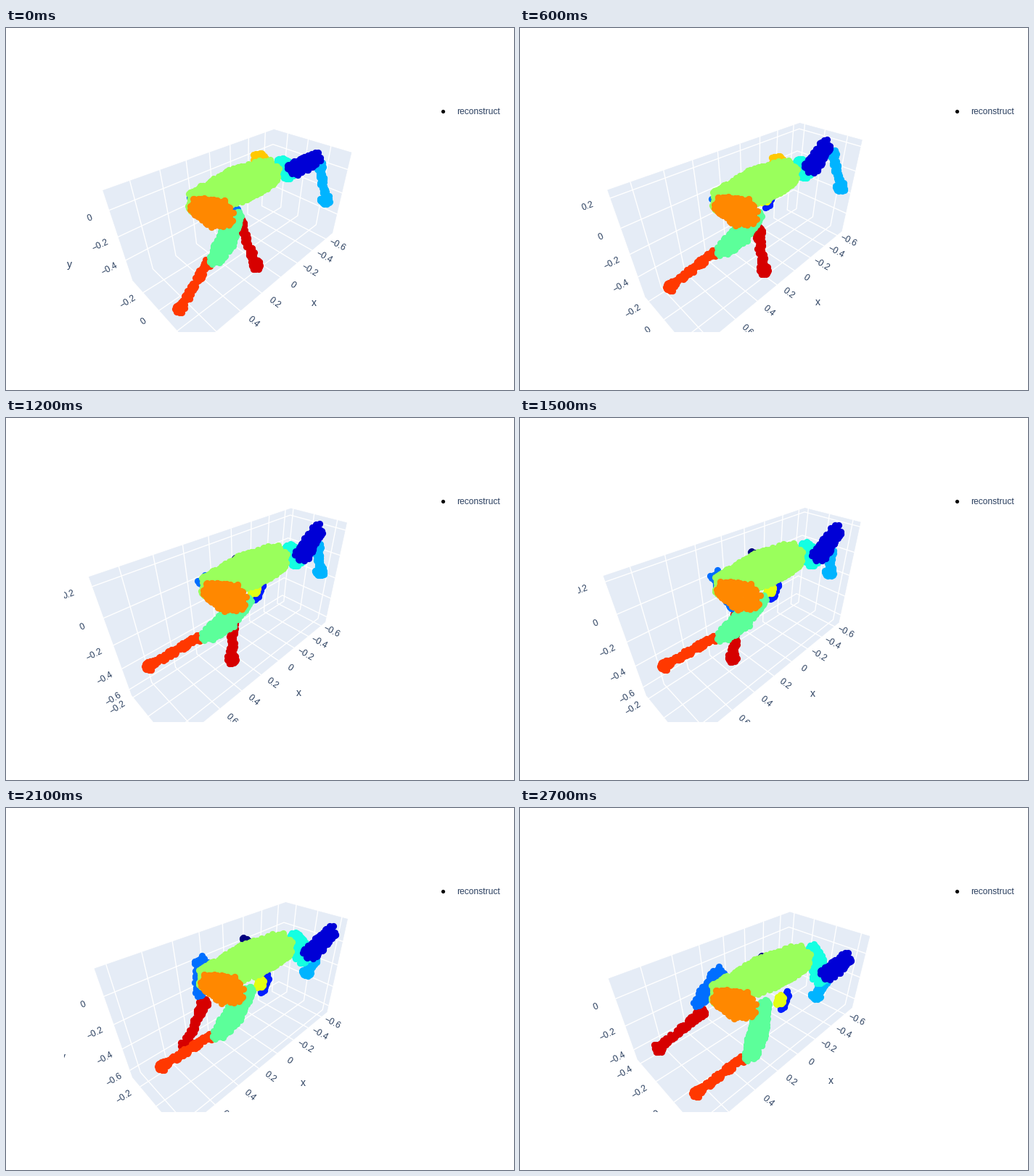
These frames come from a looping animation (700x500 px, 3000 ms). A matplotlib script:

```python
import matplotlib.pyplot as plt
import numpy as np
from matplotlib.animation import FuncAnimation
from matplotlib.patches import Polygon, Rectangle

W, H, DPI = 700, 500, 100
FRAMES, INTERVAL = 10, 300
PT = 72 / DPI
INK, WALL = "#2a3f5f", "#e5ecf6"
SCENE = (80, 100, 492, 320)
CENTER = np.array([326, 260])
FOCAL = 160 / np.tan(np.pi / 8)
EYE = 1.25 * np.sqrt(3)
TICK, TICK_GAP, TITLE_GAP = 0.2, 0.122, 0.325
DOT = 9.2

rng = np.random.default_rng(7)


def path(*poses):
    """Cubic motion through four poses spread evenly over the run."""
    curve = np.polyfit(np.linspace(0, 1, 4), np.array(poses, float), 3)
    return np.vander(np.linspace(0, 1, FRAMES), 4) @ curve


# Axis ranges
low = path((-.712, -.598, -.348), (-.675, -.628, -.230),
           (-.684, -.694, -.262), (-.718, -.491, -.446))
high = path((.758, .1315, .363), (.950, .262, .295),
            (.900, .202, .248), (.777, .130, .262))

# Skeleton: the moving joints, then those carried along by the trunk
chest = path((263, 241), (280, 236), (279, 232), (275, 257))
rump = path((359, 200), (368, 198), (375, 190), (383, 208))
knee = path((289, 319), (277, 302), (285, 304), (318, 342))
hoof = path((240, 387), (200, 347), (206, 346), (244, 393))
far_shoulder = path((262, 234), (274, 232), (270, 214), (274, 228))
far_knee = path((322, 270), (322, 280), (286, 270), (249, 283))
far_hoof = path((344, 327), (325, 334), (271, 329), (191, 331))
stifle = path((397, 195), (404, 192), (415, 195), (423, 230))
hock = path((428, 179), (424, 156), (443, 160), (450, 207))
shin = path((432, 187), (430, 170), (427, 196), (421, 238))
hind_hoof = path((440, 237), (438, 214), (420, 217), (408, 258))
far_thigh = path((336, 230), (343, 249), (350, 250), (361, 277))
tail = path((318, 222), (316, 206), (326, 182), (336, 207))
far_hip = path((346, 181), (354, 188), (358, 198), (360, 205))
belly = 0.4 * chest + 0.6 * rump
shoulder = belly + (-3, 43)
thigh = (shoulder + knee) / 2 + (0, 3)


class Part:
    """A cloud of dots around a chain of joints."""

    def __init__(self, color, count, radii, *joints):
        self.color = np.array(color) / 255
        self.joints = joints
        self.t = rng.permutation(np.linspace(0, len(radii) - 1, count))
        angle = rng.uniform(0, 2 * np.pi, count)
        reach = (self.along(radii) - DOT / 2) * rng.random(count) ** 0.4
        self.offset = np.column_stack([reach * np.cos(angle), reach * np.sin(angle)])

    def along(self, values):
        return np.interp(self.t, np.arange(len(values)), values)

    def dots(self, frame):
        xs, ys = zip(*(joint[frame] for joint in self.joints))
        return np.column_stack([self.along(xs), self.along(ys)]) + self.offset


def leg(color, top, foot, thickness):
    """A thin limb that ends in a round foot."""
    return [Part(color, 80, (thickness + 1, thickness), top, foot),
            Part(color, 35, (11.5, 11.5), foot, foot)]


# Far parts first
parts = [
    Part((0, 0, 127), 40, (10, 9), tail, tail + (3, 8)),
    Part((255, 200, 0), 60, (13, 12), far_hip, far_hip + (6, -2)),
    Part((0, 30, 255), 40, (8, 7.5), far_thigh + (7, -22), far_thigh),
    Part((226, 255, 20), 40, (9, 9), far_thigh + (-2, -15), far_thigh + (-4, -7)),
    *leg((0, 180, 255), shin, hind_hoof, 8),
    *leg((214, 0, 0), far_knee, far_hoof, 8.5),
    Part((214, 0, 0), 35, (11, 11), far_knee, far_knee),
    Part((0, 110, 255), 200, (15, 12), far_shoulder, far_knee + (-4, -14)),
    Part((20, 255, 226), 220, (14, 17), rump + (20, -12), stifle + (-8, 3)),
    Part((154, 255, 92), 1500, (22, 29, 24), chest, belly, rump),
    *leg((255, 56, 0), knee + (-9, 2), hoof, 8.5),
    Part((92, 255, 154), 320, (11, 18, 14), shoulder, thigh, knee),
    Part((255, 136, 0), 360, (15, 26), chest + (-2, 4), chest + (31, 17)),
    Part((0, 0, 214), 220, (15, 13), stifle, hock),
]

fig = plt.figure(figsize=(W / DPI, H / DPI), dpi=DPI, facecolor="white")
ax = fig.add_axes([0, 0, 1, 1])


def project(point):
    x, y, z = point
    depth = EYE - (x + y + z) / np.sqrt(3)
    right = (z - x) / np.sqrt(2)
    up = (2 * y - x - z) / np.sqrt(6)
    return CENTER + FOCAL / depth * np.array([right, -up])


def draw(frame):
    ax.clear()
    ax.set(xlim=(0, W), ylim=(H, 0))
    ax.axis("off")
    x0, y0, width, height = SCENE
    window = Rectangle((x0, y0), width, height, transform=ax.transData)

    span = high[frame] - low[frame]
    middle = (high[frame] + low[frame]) / 2
    scale = np.prod(span) ** (1 / 3)
    half = span / scale / 2

    def clip(artist):
        artist.set_clip_on(True)
        artist.set_clip_path(window)

    def edge(signs, axis, value):
        """Point on a box edge parallel to the axis."""
        point = half * signs
        point[axis] = value
        return point

    def label(text, point, side, gap, size, turn):
        out = point.copy()
        out[side] += gap
        at = project(out)
        dx, dy = at - project(point)
        angle = (np.degrees(np.arctan2(-dy, dx)) + 90) % 180 - 90
        clip(ax.text(*at, text, color=INK, size=size * PT,
                     family="Liberation Sans", rotation=angle if turn else 0,
                     ha="center", va="center", zorder=3))

    # The three back walls, one per axis
    for axis in range(3):
        others = [i for i in range(3) if i != axis]
        corners = []
        for pair in ((-1, -1), (-1, 1), (1, 1), (1, -1)):
            corner = -half
            corner[others] = half[others] * pair
            corners.append(project(corner))
        clip(ax.add_patch(Polygon(corners, fc=WALL, ec=WALL, lw=0.4, zorder=1)))

    # Labels stand beyond the edge on `side`; grid lines bend at the back corner
    for axis, side in ((0, 2), (1, 0), (2, 0)):
        front, back, far = -np.ones(3), -np.ones(3), -np.ones(3)
        front[side] = 1
        far[3 - axis - side] = 1
        first = int(np.ceil(low[frame, axis] / TICK))
        last = int(np.floor(high[frame, axis] / TICK))
        for k in range(first, last + 1):
            value = (k * TICK - middle[axis]) / scale
            line = [project(edge(s, axis, value)) for s in (front, back, far)]
            clip(ax.plot(*zip(*line), color="white", lw=1.4 * PT, zorder=2)[0])
            text = f"{k * TICK:.1f}".replace("-", "\u2212") if k else "0"
            label(text, edge(front, axis, value), side, TICK_GAP, 12, True)
        label("xyz"[axis], edge(front, axis, 0), side, TITLE_GAP, 14, False)

    for order, part in enumerate(parts):
        clip(ax.scatter(*part.dots(frame).T, s=(DOT * PT) ** 2, color=[part.color],
                        linewidths=0, zorder=4 + order))

    ax.scatter([601.5], [114.5], s=(5.2 * PT) ** 2, color="black", linewidths=0)
    ax.text(621.5, 119, "reconstruct", color=INK, size=12 * PT,
            family="Liberation Sans", va="baseline")
    return []


animation = FuncAnimation(fig, draw, frames=FRAMES, interval=INTERVAL,
                          init_func=lambda: [], repeat=True)
plt.show()
```
